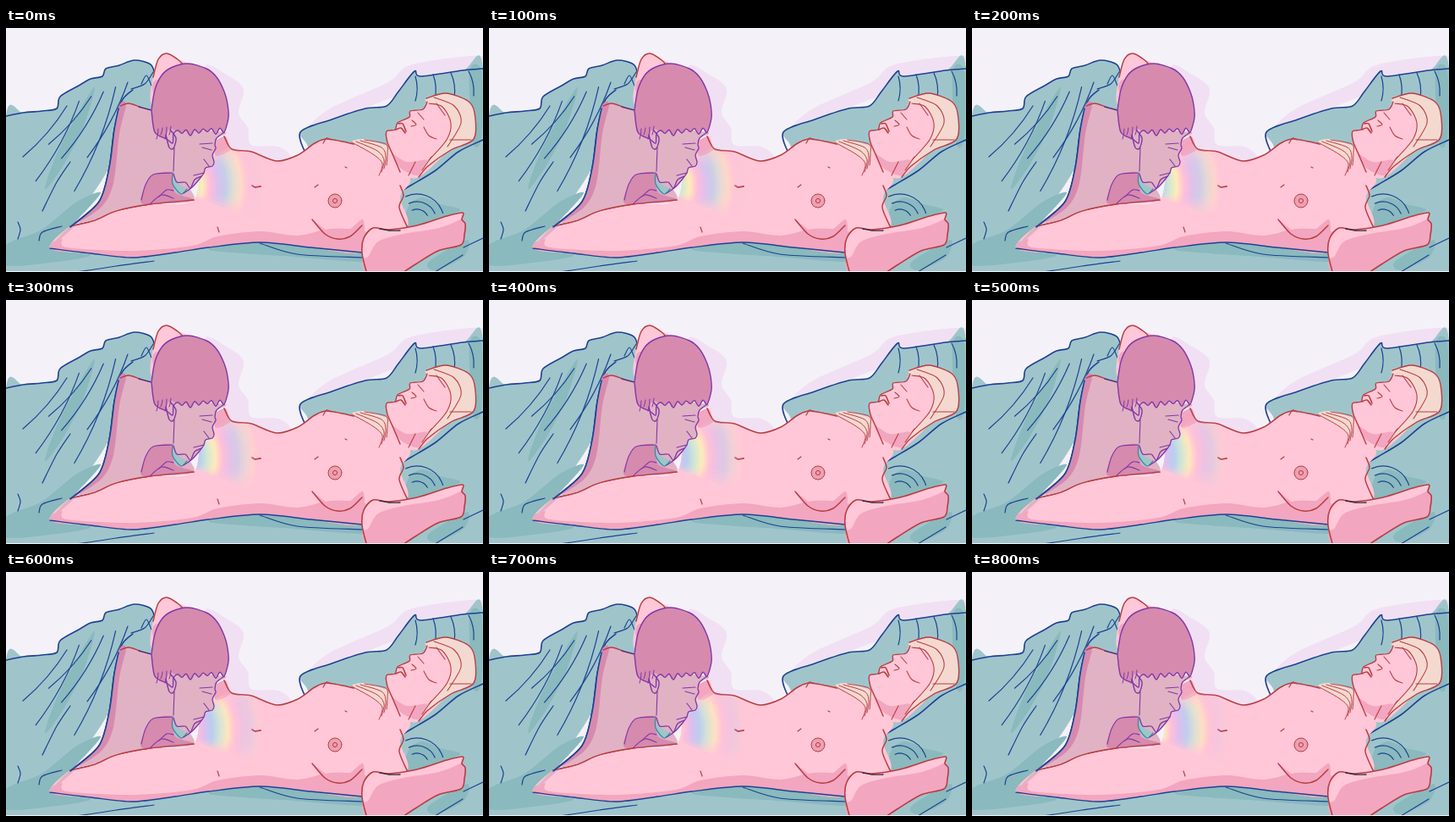
An HTML page with a canvas that plays this animation: 564 px wide and 288 px high, repeating every 0.9 s.

```html
<!DOCTYPE html>
<html lang="en">
<head>
<meta charset="utf-8">
<title>Rainbow waves</title>
<style>
html, body { margin: 0; width: 100%; height: 100%; overflow: hidden; background: #f5f1f8; }
canvas { display: block; width: 564px; height: 288px; }
</style>
</head>
<body>
<canvas id="stage" width="564" height="288"></canvas>
<script>
const ctx = document.getElementById('stage').getContext('2d');
const LOOP = 900, STEPS = 9;
const PAPER = '#f5f1f8', HALO = '#f1e0f3';
const TEAL = '#9fc5cb', TEAL_DARK = '#8ab9be', NAVY = '#1d4293';
const SKIN = '#ffc7d7', SKIN_DARK = '#f3a6bf', RED = '#b83d43';
const MAUVE = '#e1b2c4', PLUM = '#d68aae', PURPLE = '#8038a6', HAIR = '#f4d9d1';

const lerp = (a, b, t) => a + (b - a) * t;

// Smooth curve through "x,y x,y ..." key points.
function spline(text, closed) {
  const p = text.split(' ').map(s => s.split(',').map(Number));
  const n = p.length, path = new Path2D();
  const at = i => closed ? p[(i + n) % n] : p[Math.max(0, Math.min(n - 1, i))];
  path.moveTo(...p[0]);
  for (let i = 0; i < (closed ? n : n - 1); i++) {
    const a = at(i - 1), b = at(i), c = at(i + 1), d = at(i + 2), k = 0.15;
    path.bezierCurveTo(b[0] + (c[0] - a[0]) * k, b[1] + (c[1] - a[1]) * k,
      c[0] - (d[0] - b[0]) * k, c[1] - (d[1] - b[1]) * k, c[0], c[1]);
  }
  return path;
}

function fill(color, text) {
  ctx.fillStyle = color;
  ctx.fill(spline(text, true));
}

function line(color, width, ...texts) {
  ctx.strokeStyle = color;
  ctx.lineWidth = width;
  texts.forEach(t => ctx.stroke(spline(t)));
}

// A stroke from a to b that bulges sideways by bend.
function bow(color, width, [ax, ay], [bx, by], bend) {
  ctx.strokeStyle = color;
  ctx.lineWidth = width;
  ctx.beginPath();
  ctx.moveTo(ax, ay);
  ctx.quadraticCurveTo((ax + bx) / 2 + (by - ay) * bend, (ay + by) / 2 - (bx - ax) * bend, bx, by);
  ctx.stroke();
}

function clipped(shape, paint) {
  ctx.save();
  ctx.clip(spline(shape, true));
  paint();
  ctx.restore();
}

const BLANKET_TOP = '0,104 20,100 42,98 60,95 64,81 86,68 100,60 114,57 118,48 134,44 152,38 172,44 178,66';
const BLANKET_EDGE = '150,73 137,86 128,120 122,165 110,205 76,235 52,260';
const PILLOW_TOP = '356,152 348,123 385,108 425,95 450,92 464,75 483,51 490,57 540,50 564,48';
const TORSO_TOP = '258,128 267,143 290,146 320,157 345,150 365,136 380,131 412,137';
const BODY_BOTTOM = '421,265 360,259 300,253 240,259 200,265 150,271 100,266 52,260';
const THIGH_TOP = '76,234 105,227 130,216 170,208 222,203';
const BODY = `${THIGH_TOP} 232,150 ${TORSO_TOP} 456,140 478,178 466,200 474,236 ${BODY_BOTTOM}`;

function drawBackdrop() {
  ctx.fillStyle = PAPER;
  ctx.fillRect(0, 0, 564, 288);
  fill(HALO, '235,48 262,56 281,72 275,100 286,118 290,138 322,140 337,152 320,157 265,142');
  fill(HALO, '360,115 385,94 452,64 480,43 564,33 564,54 490,70 385,110');
}

function drawBedding() {
  fill(TEAL, `${BLANKET_TOP} 173,98 137,98 122,165 52,260 0,288`);
  fill(TEAL, `${PILLOW_TOP} 564,288 0,288 0,250 52,250 300,240`);
  fill(TEAL_DARK, '104,70 92,115 68,162 46,190 64,140');
  fill(TEAL_DARK, '0,256 42,238 84,205 112,195 76,235 52,260 100,268 60,276 0,280');
  fill(TEAL_DARK, '240,262 300,254 420,266 424,276 340,270');
  fill(TEAL_DARK, '548,52 562,51 562,130 552,134');
  fill(TEAL_DARK, '476,210 492,200 514,208 536,216 476,234');
  fill(TEAL_DARK, '500,276 545,250 541,270 508,286');

  line(NAVY, 1.6, BLANKET_TOP, BLANKET_EDGE, PILLOW_TOP, '564,132 535,146 508,168 480,185 466,193');
  for (let i = 0; i < 6; i++) {
    const t = i / 5;
    bow(NAVY, 1.2, [lerp(72, 144, t), lerp(92, 64, t)],
      [lerp(20, 96, t), lerp(152, 168, t) + 28 * Math.sin(i * 2)], 0.08);
  }
  for (let i = 0; i < 4; i++) {
    bow(NAVY, 1.2, [484 + i * 21, 57 - i * 2], [484 + i * 23, 86 - i * 2], 0.15);
  }
  ctx.lineWidth = 1.2;
  for (let i = 0; i < 3; i++) {
    ctx.beginPath();
    ctx.arc(486, 228, 14 + i * 9, -2, -0.5 + i * 0.1);
    ctx.stroke();
  }
  line(NAVY, 1.2, '14,229 17,238 14,249', '39,251 43,241 66,234', '76,158 60,182 43,216',
    '148,72 164,66 174,52', '160,66 166,56 172,68', '85,288 130,281 175,275',
    '300,254 344,267 421,271', '507,288 540,268', '541,259 564,248');
}

function drawBody() {
  fill(SKIN, '172,90 175,52 180,37 190,30 204,37 214,46 204,90');
  fill(SKIN_DARK, '173,72 176,62 186,63 180,86');
  line(RED, 1.5, '174,58 180,37 190,30 203,37 210,44');
  fill(SKIN, BODY);
  clipped(BODY, () => {
    fill(SKIN_DARK, '50,262 66,249 72,259 150,263 220,257 250,246 300,240 345,245 385,237 428,242 430,270 300,262 150,280');
    fill(SKIN_DARK, '362,226 382,240 404,239 422,226 420,250 385,250');
    fill(SKIN_DARK, '249,130 260,127 267,142 248,151');
  });
  line(RED, 1.5, THIGH_TOP, TORSO_TOP, '362,226 377,243 392,249 407,246 421,233', '466,186 470,198 465,212 475,236');
  line(NAVY, 1.4, BODY_BOTTOM);
  line(RED, 1.2, '365,188 369,185', '401,164 403,165', '250,235 252,241', '375,136 379,130 384,132');
  line(RED, 1.8, '291,186 295,188 301,187');

  ctx.fillStyle = '#eda0b2';
  ctx.lineWidth = 1;
  for (const r of [8, 2.6]) {
    ctx.beginPath();
    ctx.arc(389, 204, r, 0, 7);
    ctx.fill();
    ctx.stroke();
  }
}

function drawWoman() {
  fill(HAIR, '409,135 424,131 449,139 453,148 441,174 445,160 436,150');
  for (let i = 0; i < 4; i++) {
    line(RED, 1, `${409 + i * 5},${135 - i} ${434 + i * 5},${149 - i * 4} ${445 + i * 2},${160 - i * 4} ${441 + i * 3},${174 - i * 4}`);
  }

  const profile = '498,87 493,96 478,98 477,105 463,112 460,120 450,122 451,135 458,151 466,170';
  const crown = '497,83 520,77 546,86 554,100 553,131 526,144 499,163 488,176';
  fill(SKIN, `${profile} 488,176 526,140 545,104 520,83`);
  fill(SKIN_DARK, '456,148 474,158 498,156 488,174 466,165');
  fill(HAIR, `${crown} 500,155 521,132 526,112 516,94 500,89`);
  line(RED, 1.4, profile, crown);
  line(RED, 1.1, '500,89 516,93 526,112 521,132 500,156', '506,82 530,92 538,112 522,140',
    '525,132 550,132', '484,158 476,174', '503,152 492,168',
    '494,117 500,127 509,131', '509,89 519,103', '480,109 485,114 479,116', '487,100 494,108');
  line(RED, 1.6, '461,120 467,118 472,124', '464,113 469,113 473,122');
}

function drawArm() {
  const edge = '427,291 421,266 423,248 434,236 453,238 486,233 521,222 540,218 539,226 543,231 542,244 538,256 511,263 484,279 466,291';
  fill(SKIN_DARK, edge);
  clipped(edge, () => fill(SKIN, '418,268 424,236 545,212 540,224 512,236 470,243 440,252 428,270'));
  line(RED, 1.6, edge);
  line('#2d2538', 1.3, '442,237 453,239 466,239');
}

// Rings of colour spread outwards, one period per loop.
const RAINBOW = [[255, 241, 180], [202, 236, 212], [176, 207, 242], [214, 190, 242], [255, 188, 218]];
const CENTER = [188, 186], PERIOD = 46, INNER = 30, OUTER = 118;

function hue(phase) {
  const x = (phase - Math.floor(phase)) * RAINBOW.length;
  const i = Math.floor(x), next = RAINBOW[(i + 1) % RAINBOW.length];
  return RAINBOW[i].map((v, k) => Math.round(lerp(v, next[k], x - i)));
}

function drawWaves(progress) {
  const [x, y] = CENTER;
  const paint = ctx.createRadialGradient(x, y, INNER, x, y, OUTER);
  for (let r = INNER; r <= OUTER; r += 2) {
    const alpha = 0.85 * Math.min(1, (OUTER - r) / 62) ** 1.4;
    paint.addColorStop((r - INNER) / (OUTER - INNER), `rgba(${hue((90 - r) / PERIOD + progress)},${alpha})`);
  }
  clipped(BODY, () => {
    ctx.fillStyle = paint;
    ctx.globalAlpha = 0.5;
    for (let inset = 0; inset < 0.2; inset += 0.06) {
      const from = inset - 0.54, to = 0.36 - inset;
      ctx.beginPath();
      ctx.arc(x, y, OUTER, from, to);
      ctx.arc(x, y, INNER, to, from, true);
      ctx.fill();
    }
  });
}

function drawMan() {
  fill(MAUVE, `52,260 ${THIGH_TOP} 205,170 205,125 172,97 158,93 145,89 133,95 122,165 110,205`);
  fill(PLUM, '133,95 142,90 134,125 127,183 112,212 76,234 110,205 122,165');
  fill(PLUM, '159,204 165,185 174,173 197,171 200,194 222,203 170,208');
  line(RED, 1.3, THIGH_TOP, '135,92 145,89 158,93');
  line(NAVY, 1.6, '133,95 128,120 122,165 110,205 76,235');
  line('#493276', 1.3, '157,93 172,97');
  line(PURPLE, 1.1, '160,203 165,185 174,173 197,171', '171,207 184,197 198,201', '181,199 190,191 198,192');

  const profile = '258,123 249,130 247,138 248,142 244,150 246,158 244,163 236,165 234,171 229,178 220,188 210,195';
  fill(MAUVE, `${profile} 202,187 197,171 191,139 192,120`);
  fill(TEAL, '197,171 200,181 213,190 207,196 199,191');
  line('#348c9d', 1.2, '197,171 197,184 207,196 214,190');
  line(PURPLE, 1.3, profile, '198,172 202,182 212,182 218,189 223,179 231,175');
  line(PURPLE, 1.1, '229,137 244,136', '232,141 243,144', '234,155 240,163', '222,174 234,171', '199,141 198,169');

  drawHair();
}

function drawHair() {
  // The fringe is a zigzag of uneven locks between temple and ear.
  const locks = [];
  for (let i = 0; i <= 12; i++) {
    const t = i / 12;
    locks.push(`${lerp(258, 198, t)},${lerp(121, 124, t) + (i % 2 ? -3 : 2 + 2 * Math.sin(i))}`);
  }
  const outline = `172,97 176,73 184,56 195,47 215,42 237,48 249,58 258,75 262,90 263,106 ${locks.join(' ')} 197,136 190,131 176,123 172,97`;
  fill(PLUM, outline);
  fill(MAUVE, '190,126 194,119 201,123 200,140 193,141');
  line(PURPLE, 1.4, outline, '189,126 193,141 198,142 201,130 194,120');
  for (let i = 0; i < 4; i++) {
    const x = 180 + i * 5;
    bow(PURPLE, 1, [x, 119 - i], [x - 2, 131 - i % 2 * 5], 0.1);
  }
}

function drawScene(progress) {
  ctx.lineCap = ctx.lineJoin = 'round';
  drawBackdrop();
  drawBedding();
  drawBody();
  drawWaves(progress);
  drawWoman();
  drawArm();
  drawMan();
  ctx.fillStyle = PAPER;
  ctx.fillRect(0, 287, 564, 1);
}

let shown = -1;
function tick() {
  const step = Math.floor((performance.now() % LOOP) / LOOP * STEPS);
  if (step !== shown) {
    shown = step;
    drawScene(step / STEPS);
  }
  requestAnimationFrame(tick);
}
tick();
</script>
</body>
</html>
```
